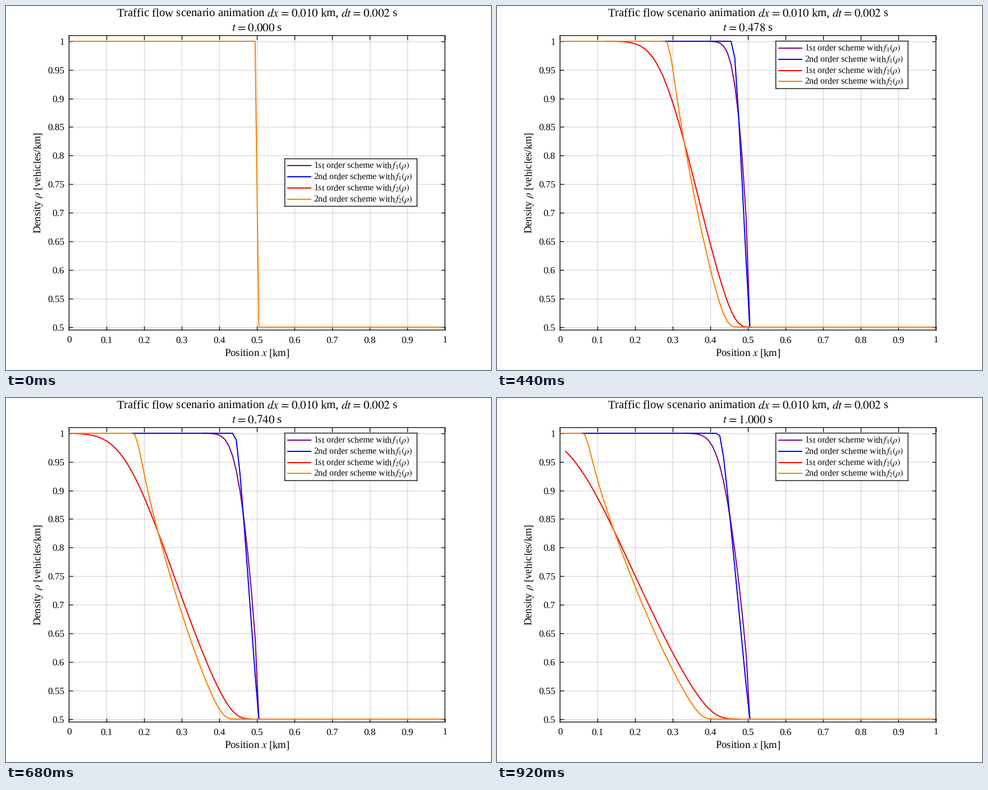
Animation of 864x648 px, one loop 960 ms. Source, as a matplotlib script:

```python
import numpy as np
import matplotlib.pyplot as plt
from matplotlib.animation import FuncAnimation

# At 72 dpi one point equals one pixel.
W, H, DPI = 864, 648, 72
FRAMES, INTERVAL = 24, 40
DX, DT, STEPS = 0.01, 0.002, 500
INK = "black"
EQ = r"\hspace{0.1}=\hspace{0.1}"

plt.rcParams.update({
    "font.family": "Liberation Serif",
    "mathtext.fontset": "stix",
    "text.hinting": "none",
})


# Traffic model: both fluxes decrease on [0.5, 1], so upwinding looks right.
def flux1(rho):
    return rho * (1 - rho) / 15


def flux2(rho):
    return -rho * np.log10(rho)


def limited_slope(rho):
    """Monotonized central slope, zero in the end cells."""
    d = np.diff(rho)
    a, b = d[:-1], d[1:]
    size = np.minimum(np.minimum(2 * abs(a), 2 * abs(b)), abs(a + b) / 2)
    slope = np.zeros_like(rho)
    slope[1:-1] = np.where(a * b > 0, np.sign(a) * size, 0)
    return slope


def solve(flux, order):
    """Explicit Euler steps with both end cells held fixed."""
    rho = np.where(x < 0.5, 1.0, 0.5)
    history = [rho]
    for _ in range(STEPS):
        face = rho - limited_slope(rho) / 2 if order == 2 else rho
        rho = rho.copy()
        rho[1:-1] -= DT / DX * np.diff(flux(face[1:]))
        history.append(rho)
    return history


x = (np.arange(100) + 0.5) * DX
SCHEMES = [
    (flux1, 1, (0.5, 0, 0.5), "1st", "f_1"),
    (flux1, 2, (0, 0, 1), "2nd", "f_1"),
    (flux2, 1, (1, 0, 0), "1st", "f_2"),
    (flux2, 2, (1, 0.5, 0), "2nd", "f_2"),
]
runs = [solve(flux, order) for flux, order, *_ in SCHEMES]

fig = plt.figure(figsize=(W / DPI, H / DPI), dpi=DPI, facecolor="white")


def box(left, top, right, bottom):
    """Pixel box, measured from the top left, as figure fractions."""
    return [left / W, 1 - bottom / H, (right - left) / W, (bottom - top) / H]


def label(px, py, text, size, ha="center", **kw):
    return fig.text(px / W, 1 - py / H, text, fontsize=size, ha=ha,
                    va="baseline", color=INK, **kw)


def style_border(axes):
    for spine in axes.spines.values():
        spine.set(linewidth=1.33, edgecolor=INK, snap=False)


# Main axes
L, T, R, B = 112.3, 52.6, 781.9, 576.8
Y0, Y1 = 0.495, 1.01
ax = fig.add_axes(box(L, T, R, B))
ax.set(xlim=(0, 1), ylim=(Y0, Y1))
ax.set_xticks(np.arange(11) / 10)
ax.set_yticks(0.5 + np.arange(11) / 20)
ax.tick_params(direction="in", length=6.7, width=1.33, color=INK, top=True,
               right=True, labelbottom=False, labelleft=False)
ax.grid(color="#262626", alpha=0.2, linewidth=1.1)
ax.set_axisbelow(True)
style_border(ax)

for i in range(11):
    label(L + (R - L) * i / 10, 599.3, f"{i / 10:g}", 17.1)
    v = 0.5 + i / 20
    label(104, B - (B - T) * (v - Y0) / (Y1 - Y0) + 5.8, f"{v:g}", 17.1, "right")

label(447, 19.3, f"Traffic flow scenario animation $dx{EQ}0.010$ km, "
                 f"$dt{EQ}0.002$ s", 20.7)
clock = label(447, 44.3, "", 20.7)
label(447, 623, "Position $x$ [km]", 18.7)
label(63, 314.5, "Density $\\rho$ [vehicles/km]", 18.7, rotation=90,
      rotation_mode="anchor")

curves = [ax.plot([], [], color=scheme[2], linewidth=2)[0]
          for scheme in SCHEMES]

# Legend panel
LEG_X, LEG_W, LEG_H = 496.7, 235.5, 84.5
legend = fig.add_axes(box(LEG_X, 272, LEG_X + LEG_W, 272 + LEG_H), zorder=5)
legend.set(xlim=(0, LEG_W), ylim=(LEG_H, 0), xticks=[], yticks=[])
style_border(legend)
for row, (_, _, color, rank, name) in enumerate(SCHEMES):
    y = 12.2 + 19.9 * row
    legend.plot([4.5, 47], [y, y], color=color, linewidth=2,
                solid_capstyle="butt")
    legend.text(51.8, y + 4.7,
                rf"{rank} order scheme with $\hspace{{-0.15}}{name}(\rho)$",
                fontsize=15.7, color=INK, va="baseline")


def visible(rho, above):
    """Blank the stretches covered by a curve above, so no fringe shows."""
    show = np.ones(len(rho), bool)
    for other in above:
        show &= abs(rho - other) > 1e-4
    show[1:-1] |= show[2:] | show[:-2]
    return np.where(show, rho, np.nan)


def draw(i):
    step = round(STEPS * i / (FRAMES - 1))
    now = [run[step] for run in runs]
    for k, curve in enumerate(curves):
        curve.set_data(x, visible(now[k], now[k + 1:]))
    clock.set_text(f"$t{EQ}{step * DT:.3f}$ s")
    # The panel jumps to the top once the fronts start to spread.
    top = 272 if i == 0 else 62.5
    legend.set_position(box(LEG_X, top, LEG_X + LEG_W, top + LEG_H))
    return curves + [clock, legend]


anim = FuncAnimation(fig, draw, frames=FRAMES, interval=INTERVAL,
                     init_func=lambda: draw(0), repeat=True, repeat_delay=0)
plt.show()
```
